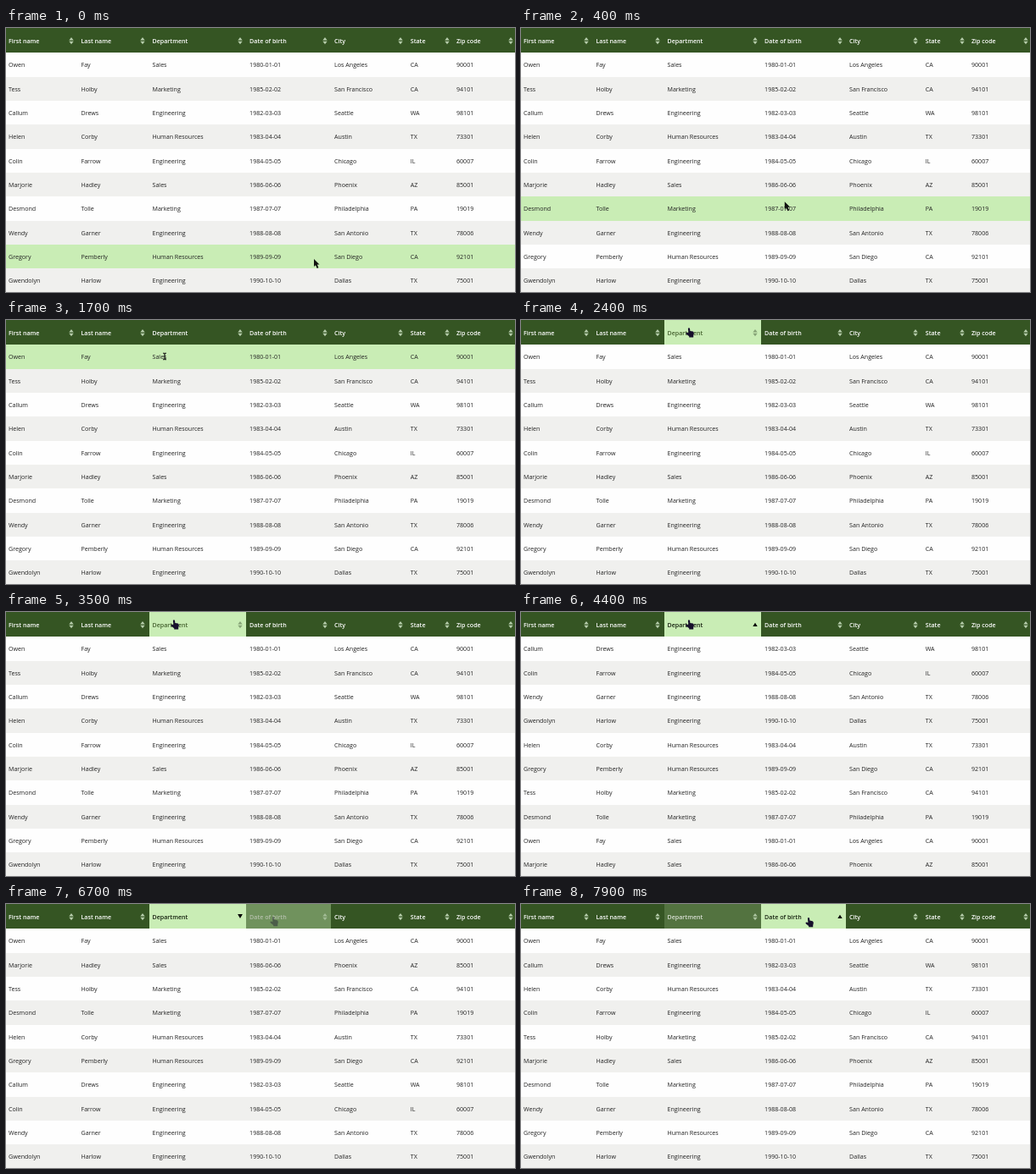
Write an HTML page that moves like this. It is 600 by 312 pixels and loops after 8 s.

```html
<!DOCTYPE html>
<html lang="en">
<head>
<meta charset="utf-8">
<title>Sortable table</title>
<style>
  html, body { margin: 0; width: 100%; height: 100%; overflow: hidden; background: #fefefe; }
  #stage {
    position: relative; width: 600px; height: 312px; overflow: hidden;
    font: 7.1px/28.33px "Open Sans", "Noto Sans", sans-serif; color: #222; white-space: pre;
  }
  #head, .row { position: absolute; left: 0; width: 600px; height: 28.33px; }
  #head { top: 0; height: 29px; line-height: 30px; background: #355523; font-weight: 600; z-index: 1; }
  .row:nth-child(even) { background: #f0f0ee; }
  .row.hover { background: #c9edb5; }
  .th, .row span { position: absolute; top: 0; }
  .th { height: 100%; box-sizing: border-box; padding-left: 3.8px; }
  .th svg { position: absolute; right: 4.5px; top: 11px; width: 6px; height: 9px; fill: currentColor; }
  #cursor { position: absolute; left: 0; top: 0; width: 12px; height: 14px; z-index: 2; overflow: visible; }
</style>
</head>
<body>
<div id="stage">
  <div id="head"></div>
  <svg id="cursor"><path/></svg>
</div>
<script>
const LOOP = 8000, STEP = 100, FADE = 250;
const TOP = 29.4, ROW = 28.33;
const DEPT = 2, BIRTH = 3;
const DARK = '#355523', LIGHT = '#c9edb5';

const titles = ['First name', 'Last name', 'Department', 'Date of birth', 'City', 'State', 'Zip code'];
const edges = [-.8, 84.7, 168.7, 283.3, 383.3, 473, 527.2, 603];
const people = `Owen|Fay|Sales|1980-01-01|Los Angeles|CA|90001
Tess|Holby|Marketing|1985-02-02|San Francisco|CA|94101
Callum|Drews|Engineering|1982-03-03|Seattle|WA|98101
Helen|Corby|Human Resources|1983-04-04|Austin|TX|73301
Colin|Farrow|Engineering|1984-05-05|Chicago|IL|60007
Marjorie|Hadley|Sales|1986-06-06|Phoenix|AZ|85001
Desmond|Tolle|Marketing|1987-07-07|Philadelphia|PA|19019
Wendy|Garner|Engineering|1988-08-08|San Antonio|TX|78006
Gregory|Pemberly|Human Resources|1989-09-09|San Diego|CA|92101
Gwendolyn|Harlow|Engineering|1990-10-10|Dallas|TX|75001`.split('\n').map(line => line.split('|'));

// Clicks: time, column, direction
const sorts = [[0, -1, 0], [4000, DEPT, 1], [5000, DEPT, -1], [7700, BIRTH, 1]];
// Highlighted headers: column -> [on, off]
const lit = { [DEPT]: [2100, 7700], [BIRTH]: [6600, LOOP + FADE] };
// Pointer tip: time, x, y
const path = [
  [0, 363, 273], [900, 245.5, 120.5], [1600, 189, 47], [1700, 187, 43], [1900, 188, 36],
  [2200, 198, 9.3], [6400, 198, 9.3], [6600, 300, 14], [6700, 315, 15], [7200, 339, 16], [LOOP, 339, 16]
];

const shapes = {
  arrow: 'M0 0V9L2 7.2 3.6 11 5.4 10.2 3.8 6.6H6.5Z',
  beam: 'M-2-4.2H-.4L0-3.7 .4-4.2H2V-3.2H.6V3.2H2V4.2H.4L0 3.7-.4 4.2H-2V3.2H-.6V-3.2H-2Z',
  hand: 'M-1.1 .7Q0-.6 1 .7L1.4 3.6 4.6 4.2Q5.8 4.8 5.8 6.4L5.2 9.2V11.2H.2V10L-3 7.4Q-4.2 5.8-2.8 5.4L-.6 6Z'
};
const up = 'M.3 3.4L3 0 5.7 3.4Z', down = 'M.3 4.8L3 8.2 5.7 4.8Z';
const bigUp = 'M.3 5.9L3 1.7 5.7 5.9Z', bigDown = 'M.1 1.1L3 5.9 5.9 1.1Z';

const stage = document.getElementById('stage');
const cursor = document.getElementById('cursor');
const pointer = cursor.firstElementChild;

function add(parent, tag, className, left) {
  const el = parent.appendChild(document.createElement(tag));
  el.className = className;
  el.style.left = left + 'px';
  return el;
}

const heads = titles.map((title, c) => {
  const el = add(document.getElementById('head'), 'div', 'th', edges[c]);
  el.style.width = edges[c + 1] - edges[c] + 'px';
  el.innerHTML = title + '<svg><path/></svg>';
  return { el, icon: el.querySelector('path') };
});

const body = add(stage, 'div', '', 0);
const rows = people.map((_, i) => {
  const el = add(body, 'div', 'row', 0);
  el.style.top = TOP + i * ROW + 'px';
  return { el, cells: titles.map((_, c) => add(el, 'span', '', edges[c] + 3.8)) };
});

const clamp = v => Math.max(0, Math.min(1, v));
const mix = (a, b, k) => `color-mix(in srgb, ${b} ${k * 100}%, ${a})`;

function pointerAt(t) {
  const n = path.findIndex(p => p[0] > t);
  const [t0, x0, y0] = path[n - 1], [t1, x1, y1] = path[n];
  const k = (t - t0) / (t1 - t0);
  return [x0 + (x1 - x0) * k, y0 + (y1 - y0) * k];
}

// How far a header has faded to its highlight, 0 to 1
function glow(c, t) {
  const [on, off] = lit[c] || [LOOP, LOOP];
  return clamp((t - on) / FADE) * (1 - clamp((t - off) / FADE));
}

let shown;
function fill(sort) {
  if (sort === shown) return;
  shown = sort;
  const [, col, dir] = sort;
  const list = [...people].sort((a, b) => dir && dir * a[col].localeCompare(b[col]));
  rows.forEach(({ cells }, i) => cells.forEach((cell, c) => { cell.textContent = list[i][c]; }));
}

function drawHeads(t, [, col, dir]) {
  heads.forEach(({ el, icon }, c) => {
    const k = glow(c, t);
    const sorted = c === col;
    el.style.background = mix(DARK, LIGHT, k);
    el.style.color = sorted ? '#14200e' : mix('#fff', '#45622f', k);
    icon.style.fill = sorted ? '#000' : mix('#b5ccaa', '#86a377', k);
    icon.setAttribute('d', !sorted ? up + down : dir > 0 ? bigUp : bigDown);
  });
}

function drawPointer(t) {
  const [x, y] = pointerAt(t);
  const over = y < TOP ? -1 : Math.floor((y - TOP) / ROW);
  rows.forEach(({ el }, i) => el.classList.toggle('hover', i === over));
  let kind = 'hand';
  if (over >= 0) {
    const nearText = Math.abs(y - TOP - (over + .5) * ROW) < 5;
    const onText = rows[over].cells.some(s => x > s.offsetLeft && x < s.offsetLeft + s.offsetWidth);
    kind = nearText && onText ? 'beam' : 'arrow';
  }
  pointer.setAttribute('d', shapes[kind]);
  pointer.setAttribute('fill', kind === 'hand' ? '#17102c' : '#111');
  cursor.style.transform = `translate(${x}px, ${y}px)`;
  // The pointer blends in together with the second highlight
  cursor.style.opacity = t < lit[BIRTH][0] ? 1 : Math.max(.4, glow(BIRTH, t));
}

function draw() {
  const t = Math.floor(performance.now() % LOOP / STEP) * STEP;
  const sort = sorts.filter(s => s[0] <= t).pop();
  fill(sort);
  drawHeads(t, sort);
  drawPointer(t);
  requestAnimationFrame(draw);
}
draw();
</script>
</body>
</html>
```
